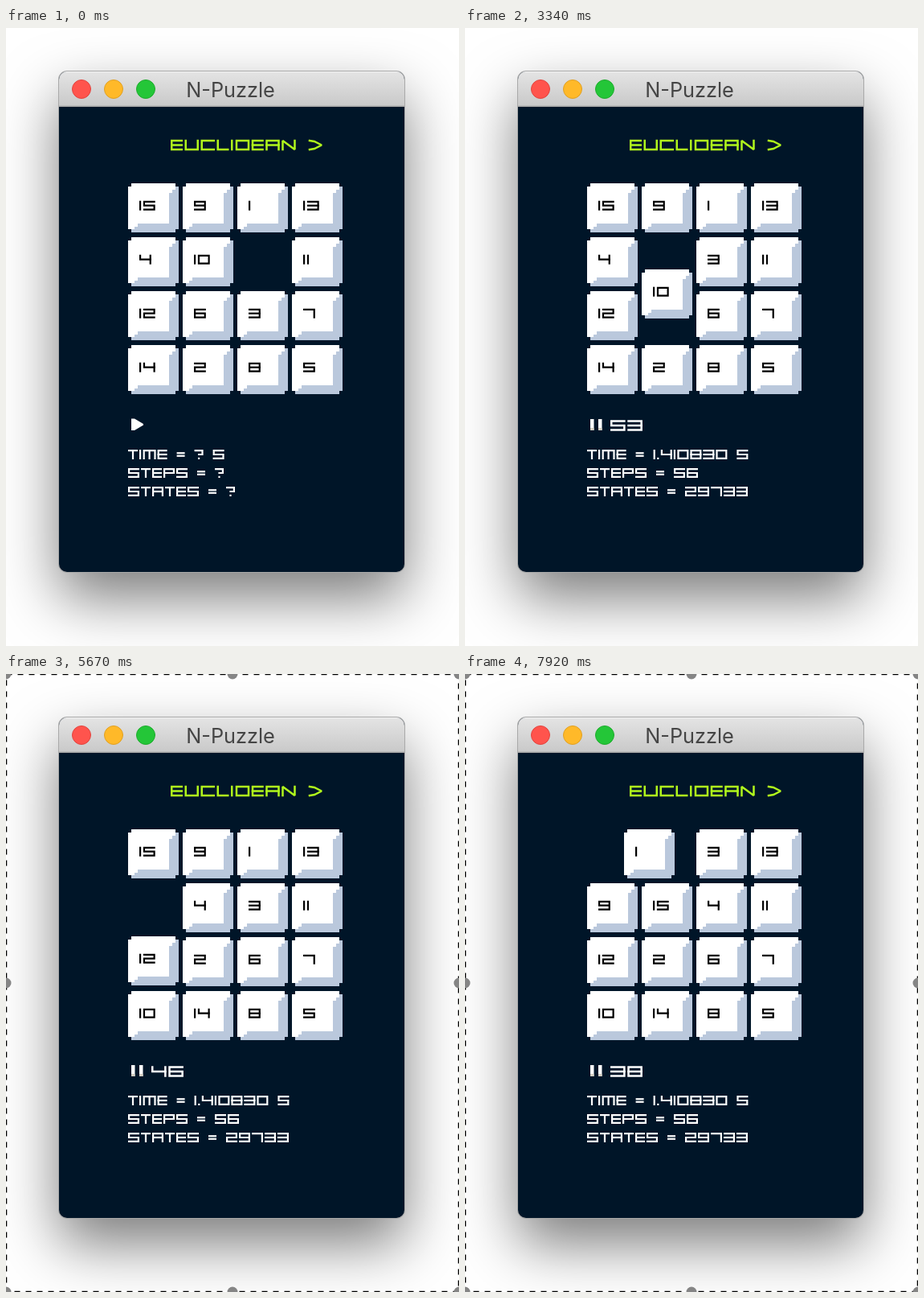
An HTML page with a canvas for the animation above (8 s loop, 564 by 768 pixels).

```html
<!DOCTYPE html>
<html lang="en">
<head>
<meta charset="utf-8">
<title>N-Puzzle</title>
<style>
  html, body { margin: 0; width: 564px; height: 768px; overflow: hidden; background: #fff; }
  canvas { display: block; }
</style>
</head>
<body>
<canvas id="stage" width="564" height="768"></canvas>
<script>
const ctx = document.getElementById('stage').getContext('2d');
const LOOP = 8000, FPS = 12;
const SOLVED_AT = 1840, SELECTED_AT = 5500;
const NAVY = '#001528', BEVEL = '#bac8dc', LIME = '#b0f61c';

const START = [15, 9, 1, 13, 4, 10, 0, 11, 12, 6, 3, 7, 14, 2, 8, 5];
const MOVES = [3, 6, 10, 4, 12, 10, 2, 14, 10, 12, 15, 9, 1, 3, 4, 15, 9, 1];
// [tick, moves completed]
const PACE = [[32, 0.4], [48, 4.8], [61, 8.08], [76, 12.16], [85, 14.72], [95, 17.32]];

// Glyph strokes name points on a 3 x 5 lattice, row by row.
const LATTICE = '123abc456def789', ROWS = [0, 0.32, 0.5, 0.68, 1];
const GLYPHS = {
  0: '13971', 1: '17', 2: '136479', 3: '1397 46', 4: '146 39', 5: '314697',
  6: '317964', 7: '139', 8: '13971 46', 9: '641397',
  A: '7139 46', C: '3179', D: '13971', E: '3179 46', I: '17', L: '179', M: '7139 28',
  N: '7193', P: '71364', S: '314697', T: '13 28', U: '1793',
  '=': 'ac df', '?': '1365 8', '.': '7', ' ': ''
};
const WIDTHS = { 1: 2.6, I: 2.6, '.': 2.6, T: 12, E: 12, L: 12, M: 16, '=': 10, '?': 11, ' ': 8 };

function pixelText(text, x, middle, scale, height, color, weight = 2.2) {
  ctx.strokeStyle = ctx.fillStyle = color;
  ctx.lineWidth = weight;
  ctx.lineCap = 'square';
  ctx.miterLimit = 2;
  for (const char of text) {
    const width = (WIDTHS[char] || 14) * scale;
    for (const stroke of GLYPHS[char].split(' ')) {
      const points = [...stroke].map(key => {
        const i = LATTICE.indexOf(key);
        return [x + weight / 2 + (i % 3) / 2 * (width - weight),
                middle + (ROWS[i / 3 | 0] - 0.5) * (height - weight)];
      });
      if (points.length === 1) {
        const [px, py] = points[0];
        ctx.fillRect(px - weight / 2, py - weight / 2, weight, weight);
      } else {
        ctx.beginPath();
        points.forEach(p => ctx.lineTo(...p));
        ctx.stroke();
      }
    }
    x += width + 2 * scale;
  }
}

function polygon(color, ...points) {
  ctx.fillStyle = color;
  ctx.beginPath();
  points.forEach(p => ctx.lineTo(...p));
  ctx.fill();
}

function rect(color, ...box) {
  ctx.fillStyle = color;
  ctx.fillRect(...box);
}

function disc(x, y, radius, color, edge) {
  ctx.beginPath();
  ctx.arc(x, y, radius, 0, 7);
  ctx.fillStyle = color;
  ctx.fill();
  if (edge) {
    ctx.lineWidth = 1;
    ctx.strokeStyle = edge;
    ctx.stroke();
  }
}

function drawWindow() {
  rect('#fff', 0, 0, 564, 768);
  ctx.save();
  ctx.beginPath();
  ctx.roundRect(66, 54, 430, 622, 10);
  ctx.shadowColor = 'rgba(0,0,0,.52)';
  ctx.shadowBlur = 72;
  ctx.shadowOffsetY = 32;
  ctx.fillStyle = NAVY;
  ctx.fill();
  ctx.shadowColor = 'transparent';
  ctx.strokeStyle = '#a9a9a9';
  ctx.lineWidth = 2;
  ctx.stroke();
  ctx.clip();
  rect(NAVY, 66, 54, 430, 622);
  const bar = ctx.createLinearGradient(0, 54, 0, 97);
  bar.addColorStop(0, '#e4e4e4');
  bar.addColorStop(1, '#c9c9c9');
  rect(bar, 66, 54, 430, 43);
  rect('#f2f2f2', 66, 54, 430, 1);
  rect('#a6a6a6', 66, 96.5, 430, 1.5);
  ctx.restore();

  disc(94, 76, 11.5, '#ff544d', '#e2443f');
  disc(134, 76, 11.5, '#ffb929', '#e0a023');
  disc(174, 76, 11.5, '#24c638', '#1dac2c');
  ctx.fillStyle = '#454545';
  ctx.font = '25.3px Inter, sans-serif';
  ctx.textAlign = 'center';
  ctx.fillText('N-Puzzle', 279.5, 86);

  pixelText('EUCLIDEAN', 205, 145.5, 1.25, 13.5, LIME, 2.5);
  ctx.beginPath();
  [[378, 140], [384, 141], [393, 145.5], [384, 150], [378, 151]].forEach(p => ctx.lineTo(...p));
  ctx.stroke();
}

function drawTile(number, col, row) {
  ctx.save();
  ctx.translate(Math.round(152 + col * 68), Math.round(193 + row * 67));
  rect(BEVEL, 4, 0, 55, 61);
  rect(BEVEL, 0, 4, 63, 53);
  polygon('#fff', [4, 0], [59, 0], [59, 8], [55, 8], [55, 12], [51, 12], [51, 50], [12, 50],
    [12, 54], [8, 54], [8, 57], [0, 57], [0, 4], [4, 4]);
  pixelText(String(number), 14, 27.7, 1.06, 12, '#000');
  ctx.restore();
}

function progress(tick) {
  if (tick < PACE[0][0]) return 0;
  const i = Math.max(1, PACE.findIndex(([at]) => at >= tick));
  const [t0, p0] = PACE[i - 1], [t1, p1] = PACE[i];
  return p0 + (p1 - p0) * (tick - t0) / (t1 - t0);
}

function drawBoard(done) {
  const board = [...START], current = Math.floor(done);
  const swap = tile => {
    const from = board.indexOf(tile), to = board.indexOf(0);
    board[to] = tile;
    board[from] = 0;
    return from;
  };
  MOVES.slice(0, current).forEach(swap);
  const moving = MOVES[current], from = swap(moving), left = 1 - (done - current);
  board.forEach((tile, i) => {
    if (!tile) return;
    let col = i % 4, row = i >> 2;
    if (tile === moving) {
      col += (from % 4 - col) * left;
      row += ((from >> 2) - row) * left;
    }
    drawTile(tile, col, row);
  });
}

function drawStatus(solved, playing, done) {
  if (playing) {
    for (const x of [156, 166]) {
      rect('#fff', x, 486, 4.5, 14);
      rect('#d5cfc3', x, 497, 4.5, 3);
    }
  } else {
    polygon('#fff', [156, 485.5], [160, 485.5], [171, 492], [171, 493.5], [160, 500], [156, 500]);
  }
  if (solved) {
    pixelText(String(playing ? 55 - Math.floor(done) : 56), 181, 494, 1.33, 13.5, '#fff', 2.5);
  }
  const line = (text, y) => pixelText(text, 152, y, 1, 12, '#fff');
  line('TIME = ' + (solved ? '1.410830' : '?') + ' S', 530);
  line('STEPS = ' + (solved ? '56' : '?'), 553);
  line('STATES = ' + (solved ? '29733' : '?'), 576);
}

function drawSelection() {
  ctx.save();
  ctx.lineWidth = 1.5;
  ctx.lineCap = 'butt';
  ctx.strokeStyle = '#fff';
  ctx.strokeRect(0.5, 0.5, 563, 767);
  ctx.strokeStyle = '#000';
  ctx.setLineDash([7, 7]);
  ctx.strokeRect(0.5, 0.5, 563, 767);
  ctx.restore();
  for (const x of [0, 282, 564]) {
    for (const y of [0, 384, 768]) {
      if (x !== 282 || y !== 384) disc(x, y, 6.5, '#858585');
    }
  }
}

function draw() {
  const time = performance.now() % LOOP;
  const tick = Math.floor(time * FPS / 1000);
  const done = progress(tick);
  drawWindow();
  drawBoard(done);
  drawStatus(time >= SOLVED_AT, done > 0, done);
  if (time >= SELECTED_AT) drawSelection();
  requestAnimationFrame(draw);
}
draw();
</script>
</body>
</html>
```
